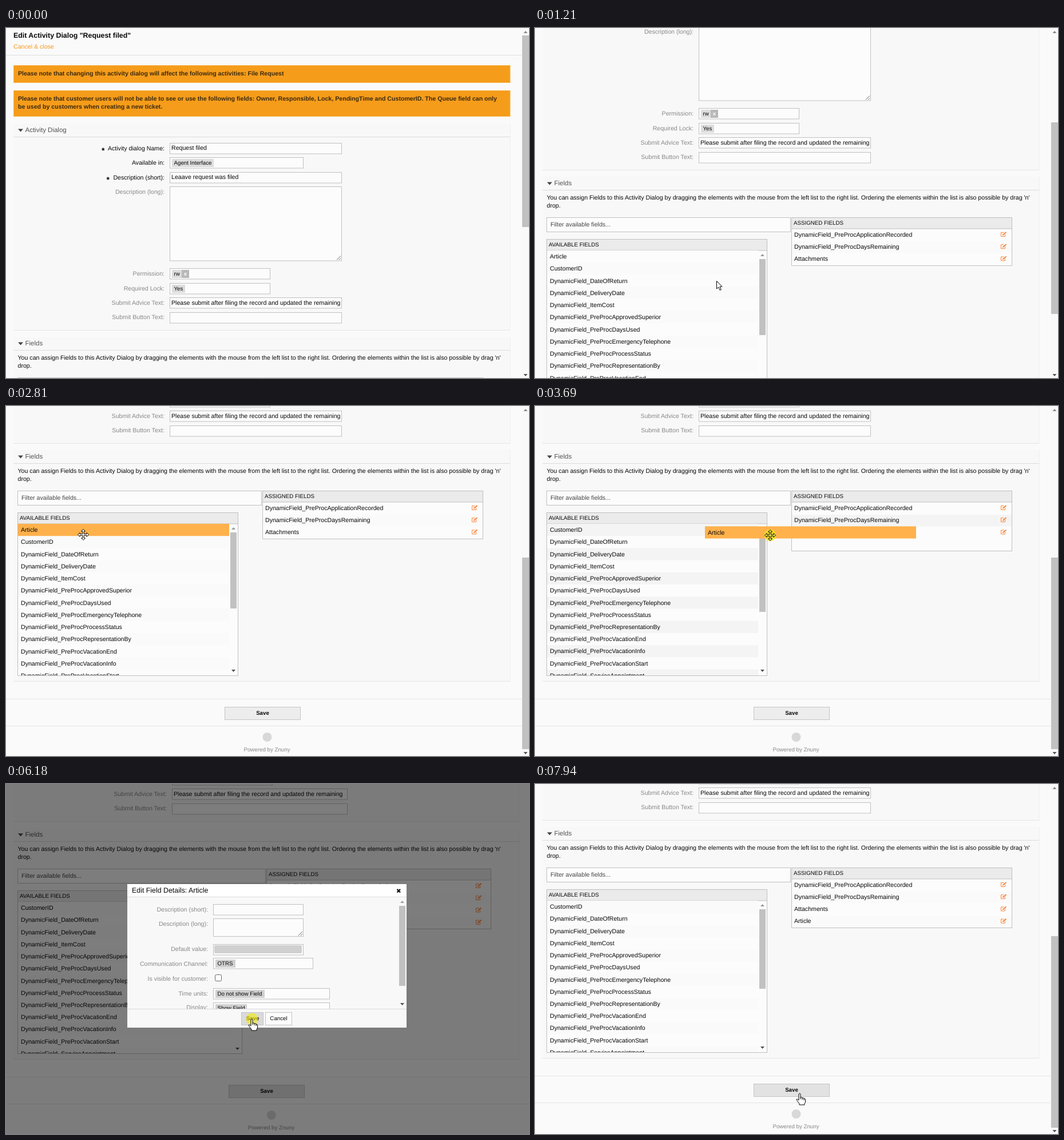
Recreate the animation shown at these times as an HTML page. Size 914 by 612 pixels, loop 8 s.

```html
<!DOCTYPE html>
<html lang="en">
<head>
<meta charset="utf-8">
<title>Activity dialog</title>
<style>
html, body { margin: 0; width: 100%; height: 100%; overflow: hidden; background: #fafafa; }
#stage { display: block; width: 100vw; height: 100vh; }
text { font: 10.62px "Liberation Sans", Arial, sans-serif; fill: #080808; text-rendering: geometricPrecision; white-space: pre; }
.small { font-size: 9.73px; }
.head { font-size: 11.5px; fill: #555; }
.title { font-size: 12.38px; }
.star { font-size: 14px; }
.bold { font-weight: bold; }
.end { text-anchor: end; }
.mid { text-anchor: middle; }
.dim { fill: #888; }
.hint { fill: #444; }
.light { fill: #fff; }
.note { fill: #3b2a10; }
.link { fill: #f8971d; }
.icon { fill: none; stroke: #f9853a; }
.stripe { fill: #fafafa; }
.lifted .stripe { fill: #f4f4f4; }
.assigned { height: 84px; }
.moved .assigned { height: 105px; }
.thumb { height: 133px; }
.moved .thumb { height: 139px; }
.moved .rows { transform: translateY(-21.23px); }
.lifted .row0, .new, #wide, #modal, .moved #hover { display: none; }
.dropped .new { display: inline; }
.modal #wide, .modal #modal { display: inline; }
.modal #narrow { display: none; }
.button { fill: #ededed; }
.over .button { fill: #e2e2e2; }
.choice { fill: #fcfcfc; }
.over .choice { fill: #dadada; }
#focus { stroke: #666; }
.press #focus { stroke: #c0c0c0; }
#cursor path { fill: #fff; stroke: #000; stroke-linejoin: round; }
.press #cursor #move { fill: #f6f05e; }
</style>
</head>
<body>
<svg id="stage" viewBox="0 0 914 612" preserveAspectRatio="none"></svg>
<script>
const LOOP = 8000, ROW = 21.23, LIST_TOP = 669, INPUT_H = 18.5, ORANGE = '#ffb14b';
const P = 'DynamicField_', PP = P + 'PreProc';
const available = ['Article', 'CustomerID',
  ...['DateOfReturn', 'DeliveryDate', 'ItemCost'].map(n => P + n),
  ...['ApprovedSuperior', 'DaysUsed', 'EmergencyTelephone', 'ProcessStatus', 'RepresentationBy',
    'VacationEnd', 'VacationInfo', 'VacationStart'].map(n => PP + n),
  P + 'ServiceAppointment'];
const assigned = [PP + 'ApplicationRecorded', PP + 'DaysRemaining', 'Attachments', 'Article'];

const text = (x, y, s, cls = '') => `<text x="${x}" y="${y - .6}" class="${cls}">${s}</text>`;
const fill = (x, y, w, h, color, attrs = '') =>
  `<rect x="${x}" y="${y}" width="${w}" height="${h}" fill="${color}" ${attrs}/>`;
const box = (x, y, w, h, color = '#fcfcfc', stroke = '#c0c0c0', attrs = '') =>
  fill(x + .5, y + .5, w, h, color, `stroke="${stroke}" ${attrs}`);
const input = (x, y, w, ...style) => box(x, y, w, INPUT_H, ...style);
const line = (x1, x2, y, color = '#e5e5e5') => fill(x1, y, x2 - x1, 1, color);
const path = (d, attrs = '') => `<path d="${d}" ${attrs}/>`;
const clip = (x, y, w, h, body) => `<svg x="${x}" y="${y}" width="${w}" height="${h}">${body}</svg>`;
const arrow = (x, y, dir, color = '#505050') =>
  path(`M${x - 3.5} ${y - 2 * dir}h7l-3.5 ${4 * dir}z`, `fill="${color}"`);
const chip = (x, y, w, s, color = '#dcdcdc') => fill(x, y, w, 14, color) + text(x + 3.5, y + 11, s, 'small');
const grip = (x, y) => path(`M${x - 8} ${y - 1}l7-7M${x - 4} ${y - 1}l3-3`, 'stroke="#666"');
const edit = (x, y, cls = '') => `<g class="icon ${cls}" transform="translate(${x} ${y})">` +
  path('M2.5 0V3.5H-4.5V-3.5H.5') + path('M-1.7 1.2L4.5-4', 'stroke-width="2"') + '</g>';

const narrow = { right: 881, label: 277, field: 286, fieldW: 300, filterW: 426, list: 385, side: 448, save: 448.5, foot: 456, edge: 901 };
const wide = { right: 897, label: 281, field: 290, fieldW: 306, filterW: 433, list: 392, side: 455, save: 455.5, foot: 463.5, edge: 914 };

function section(L, top, bottom, name) {
  return fill(13, top, L.right - 13, bottom - top, '#f8f8f8') + line(13, L.right, bottom) +
    fill(L.right, top, 1, bottom - top, '#efefef') + path(`M21 ${top + 9.5}h9l-4.5 5z`, 'fill="#444"') +
    text(33.5, top + 16, name, 'head') + line(13, L.right, top + 23, '#dcdcdc');
}

function form(L) {
  const { label, field: f, fieldW: w } = L;
  const row = (y, name, cls) => text(label, y, name, 'end ' + cls);
  const star = (x, y) => text(x, y, '*', 'bold star');
  return row(215, 'Activity dialog Name:', '') + star(167, 220) + input(f, 201, w) + text(f + 3, 214, 'Request filed') +
    row(240, 'Available in:', '') + input(f, 226, 233) + chip(f + 4, 229, 73, 'Agent Interface') +
    row(265.5, 'Description (short):', '') + star(175.5, 270.5) + input(f, 252, w) + text(f + 3, 265, 'Leaave request was filed') +
    row(291, 'Description (long):', 'dim') + box(f, 277, w, 129.5) + grip(f + w, 406.5) +
    row(434, 'Permission:', 'dim') + input(f, 420, 175) + chip(f + 4, 423, 17, 'rw') +
    fill(f + 21, 423, 13, 14, '#b8b8b8') + text(f + 27.5, 433.5, 'x', 'small bold mid light') +
    row(460, 'Required Lock:', 'dim') + input(f, 446, 175) + chip(f + 4, 449, 23, 'Yes') +
    row(484.5, 'Submit Advice Text:', 'dim') + input(f, 471, w) +
    clip(f + 3, 472, w - 5, 17, text(0, 12.5, 'Please submit after filing the record and updated the remaining')) +
    row(510, 'Submit Button Text:', 'dim') + input(f, 497, w);
}

function lists(L) {
  const { list, side } = L, rowW = list - 16, bar = 21 + list - 8.5;
  const rows = available.map((name, i) =>
    fill(0, i * ROW, rowW, ROW, '#fcfcfc', i % 2 ? 'class="stripe"' : '')).join('');
  const names = available.map((name, i) => text(5, i * ROW + 14.8, name, 'row' + i)).join('');
  const hover = L === narrow ? fill(0, 0, rowW, ROW, ORANGE, 'id="hover"') : '';
  const head = (x, y, name) => box(x, y, list, 19.5, '#ebebeb') + text(x + 4, y + 14, name, 'small');
  const picks = assigned.map((name, i) => {
    const y = 631 + i * ROW, cls = i === 3 ? 'new' : '';
    return (i % 2 ? fill(side + 1, y + 1, list - 1, ROW - 1, '', `class="stripe ${cls}"`) : '') +
      text(side + 5, y + 14.4, name, cls) + edit(side + 371, y + 10, cls);
  }).join('');
  return box(20, 611, L.filterW, 25) + text(27, 627.5, 'Filter available fields...', 'hint') +
    box(20, 649, list, 285) + head(20, 649, 'AVAILABLE FIELDS') +
    clip(21, LIST_TOP, rowW, 265, `<g class="rows">${rows}${hover}${names}</g>`) +
    fill(bar - 5.5, 684, 11, 133, '#c1c1c1', 'class="thumb"') + arrow(bar, 677, -1, '#999') + arrow(bar, 926, 1) +
    box(side, 611, list, 84, '#fcfcfc', '#c0c0c0', 'class="assigned"') + head(side, 611, 'ASSIGNED FIELDS') + picks;
}

function page(L) {
  const note = (y, h) => box(13, y, L.right - 13.5, h, '#f59c1a', '#f8b552');
  return fill(0, 0, 914, 1080, '#fafafa') +
    text(13, 18, 'Edit Activity Dialog "Request filed"', 'title bold') + text(13, 36.5, 'Cancel &amp; close', 'link') + line(0, L.edge, 47, '#ddd') +
    note(65, 30) + text(21, 84, 'Please note that changing this activity dialog will affect the following activities: File Request', 'bold note') +
    note(109, 45) + text(21, 127.5, 'Please note that customer users will not be able to see or use the following fields: Owner, Responsible, Lock, PendingTime and CustomerID. The Queue field can only', 'bold note') +
    text(21, 142, 'be used by customers when creating a new ticket.', 'bold note') +
    section(L, 167, 528, 'Activity Dialog') + form(L) + section(L, 540, 944, 'Fields') +
    text(20.5, 581, "You can assign Fields to this Activity Dialog by dragging the elements with the mouse from the left list to the right list. Ordering the elements within the list is also possible by drag 'n'") +
    text(20.5, 595, 'drop.') + lists(L) +
    line(0, L.edge, 975) + box(L.save - 66.5, 989, 132, 22, '', '#c4c4c4', 'class="button"') + text(L.save, 1003.5, 'Save', 'small bold mid') +
    line(0, L.edge, 1022) + `<circle cx="${L.foot + .5}" cy="1042" r="8" fill="#d8d8d8"/>` +
    text(L.foot, 1068, 'Powered by Znuny', 'small mid dim');
}

function modal() {
  const labels = { 'Description (short):': 224, 'Description (long):': 248.5, 'Default value:': 293, 'Communication Channel:': 318.5,
    'Is visible for customer:': 344.5, 'Time units:': 370.5, 'Display:': 395 };
  const tag = (y, w, s) => chip(366, y, w, s, '#d0d0d0');
  const body = Object.entries(labels).map(([name, y]) => text(353, y, name, 'end dim')).join('') +
    input(362, 210, 157, '#fcfcfc', '', 'id="focus"') + fill(365, 213, 1, 13, '#000', 'id="caret"') +
    box(362, 235, 157, 31) + grip(519, 266) +
    input(362, 280, 157) + fill(364, 282, 153, 14, '#d0d0d0', 'rx="2"') +
    input(362, 304, 174) + tag(307, 35, 'OTRS') +
    box(365, 333, 11, 11, '#fff', '#666', 'rx="2"') +
    input(362, 357, 203) + tag(360, 86, 'Do not show Field') +
    input(362, 382, 203) + tag(385, 55, 'Show Field');
  return fill(0, 0, 914, 612, '#000', 'opacity=".5"') + fill(212, 175, 488, 251, '#f8f8f8') + fill(212, 175, 488, 22, '#fff') +
    text(220, 190.5, 'Edit Field Details: Article', 'title') + path('M683.5 184l5.5 5.5m0-5.5l-5.5 5.5', 'stroke="#111" stroke-width="2.4"') +
    line(212, 700, 197, '#ddd') + clip(0, 0, 914, 393, body) +
    fill(687, 213, 11, 140, '#c1c1c1') + arrow(692.5, 206, -1, '#a0a0a0') + arrow(692.5, 385, 1) +
    line(212, 700, 393, '#d8d8d8') + box(411, 399, 38, 22, '', '#c4c4c4', 'class="choice"') + text(431, 413.5, 'Save', 'small bold mid') +
    box(453, 399, 46, 22, '#fcfcfc', '#c4c4c4') + text(476.5, 413.5, 'Cancel', 'small mid');
}

const stage = document.getElementById('stage');
stage.innerHTML =
  `<g id="narrow"><g id="scrolled">${page(narrow)}</g>${fill(901, 0, 13, 612, '#f9f9f9')}` +
  fill(902, 13, 12, 335, '#c1c1c1', 'id="bar"') + arrow(908, 7, -1, '#888') + arrow(908, 607, 1) + '</g>' +
  `<g id="wide"><g transform="translate(0 -463)">${page(wide)}</g></g><g id="modal">${modal()}</g>` +
  `<g id="dragged">${fill(0, 0, 369, ROW, ORANGE)}${text(5, 14.8, 'Article')}</g>` +
  '<g id="cursor"><circle id="click" r="10.5" fill="#f2ea12" opacity=".65"/>' +
  path('M.5 .5V14L3.7 11 6 16.5 8.3 15.5 6 10.2H10Z', 'id="arrow"') +
  path('M-2 2Q-2 0-.5 0T1 2V7Q3.5 6 4 8 6.5 7 7 9 9.5 8.5 9.5 11V15Q9 17 8 18V20H-1V18Q-5 13-6 11-5.5 8.5-2 12ZM1 7V10M4 8V11M7 9V12', 'id="hand"') +
  path('M0-9.5L3.5-6H1.2V-1.2H6V-3.5L9.5 0 6 3.5V1.2H1.2V6H3.5L0 9.5-3.5 6H-1.2V1.2H-6V3.5L-9.5 0-6-3.5V-1.2H-1.2V-6H-3.5Z', 'id="move"') + '</g>';

// Each segment: start, end, number of steps, then evenly spaced waypoints.
const pointer = [
  [190, 660, 7, [769, 577], [560, 515], [390, 462], [317, 442]],
  [1880, 2470, 9, [276, 378], [224, 315], [178, 275], [150, 248], [138, 236]],
  [2670, 2810, 3, [136, 231], [135, 225]],
  [2960, 2960, 1, [135, 222]],
  [3360, 3690, 6, [144, 222], [210, 223], [305, 224], [411, 226]],
  [3820, 4160, 6, [442, 229], [500, 238], [546, 247]],
  [4230, 4300, 2, [554, 251], [556, 253]],
  [5030, 5780, 12, [550, 256], [538, 280], [518, 350], [484, 388], [431, 415]],
  [5980, 5980, 1, [430, 411]],
  [7390, 7940, 9, [433, 418], [445, 450], [455, 485], [462, 515], [463, 541]]
];
const scroll = [
  [930, 1480, 9, [56], [280], [463]],
  [6860, 6990, 2, [464], [465]]
];

function follow(track, t) {
  const seg = track.findLast(s => t >= s[0]);
  if (!seg) return null;
  const [from, to, steps, ...points] = seg;
  const p = steps > 1 ? Math.min(1, Math.floor((t - from) / (to - from) * (steps - 1) + .15) / (steps - 1)) : 1;
  const pos = p * (points.length - 1), i = Math.floor(pos), next = points[i + 1] || points[i];
  return points[i].map((v, k) => v + (next[k] - v) * (pos - i));
}

const $ = id => document.getElementById(id);
const show = (id, on) => { $(id).style.display = on ? 'inline' : 'none'; };
const place = (id, x, y) => $(id).setAttribute('transform', `translate(${x} ${y})`);

function draw(t) {
  const at = follow(pointer, t), [x, y] = at || [0, 0];
  const offset = Math.round((follow(scroll, t) || [0])[0]);
  const inModal = t >= 4620 && t < 6310, dragging = t >= 3360 && t < 4620;
  const moving = t >= 1880 && t < 4620;
  const over = inModal ? y >= 399 && x > 411 && x < 450 : t >= 6310 && y >= 524;
  const press = t >= 3160 && t < 4300 || t >= 6180 && t < 6310;
  const state = {
    lifted: dragging,
    moved: t >= 4620 || dragging && x > 378,
    dropped: t >= 4620,
    modal: inModal, over, press
  };
  stage.setAttribute('class', Object.keys(state).filter(k => state[k]).join(' '));

  place('scrolled', 0, -offset);
  $('bar').setAttribute('y', 13 + Math.round(offset * .544));
  const hovered = Math.floor((y + 463 - LIST_TOP) / ROW);
  $('hover').setAttribute('y', hovered * ROW);
  $('hover').setAttribute('opacity', moving && !dragging ? 1 : 0);
  show('dragged', dragging);
  place('dragged', x - 114, y - 15.6);
  show('caret', Math.floor((t - 4620) / 520) % 2 === 0 && t < 6180);

  show('cursor', at);
  place('cursor', x, y);
  show('move', moving);
  show('hand', over);
  show('arrow', !moving && !over);
  show('click', press);
}

function tick(now) {
  draw(now % LOOP);
  requestAnimationFrame(tick);
}
draw(0);
requestAnimationFrame(tick);
</script>
</body>
</html>
```
